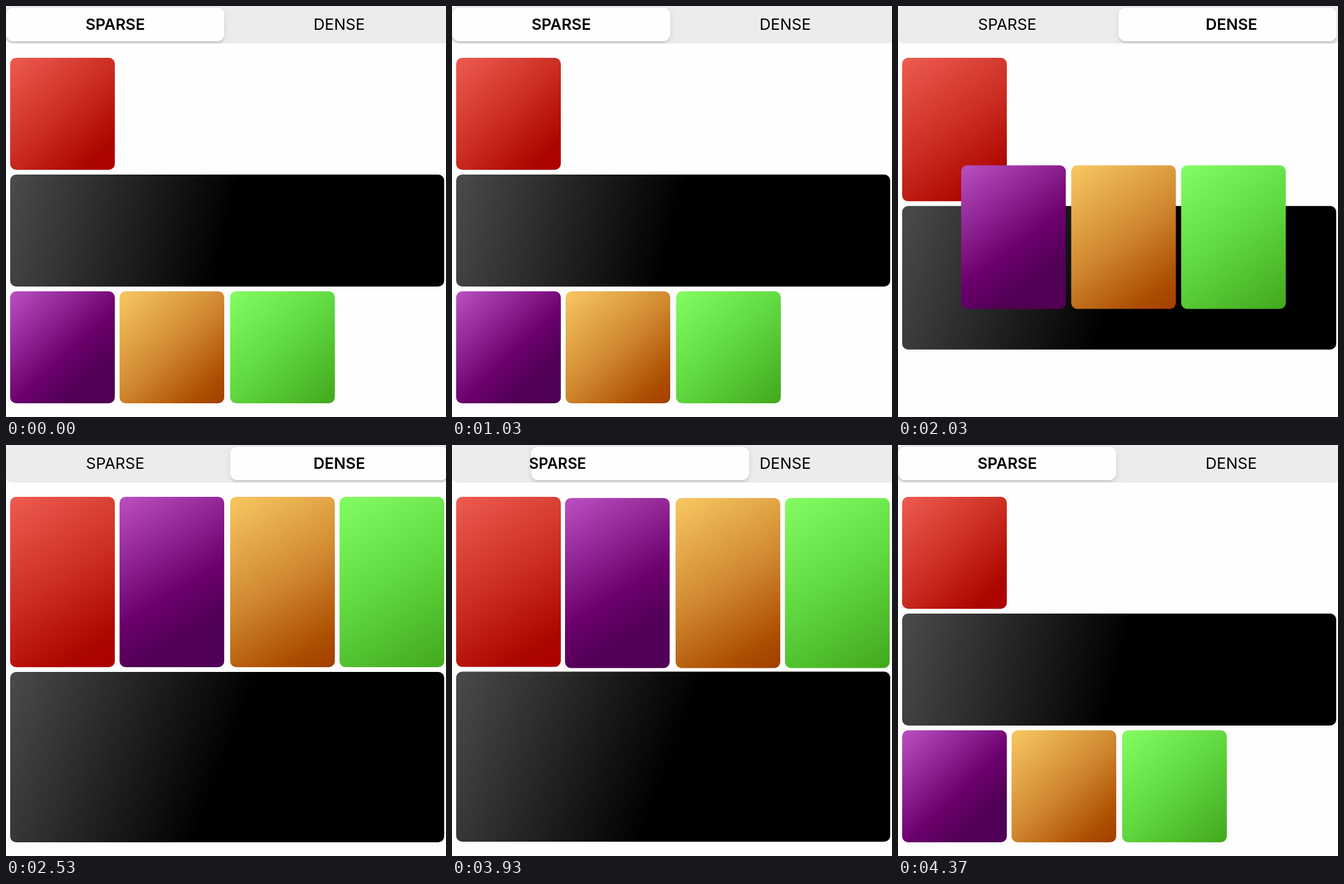
Recreate the animation shown at these times as an HTML page with a canvas. Size 740 by 690 pixels, loop 4410 ms.

```html
<!DOCTYPE html>
<html lang="en">
<head>
<meta charset="utf-8">
<title>Sparse and dense grid</title>
<style>
  html, body { margin: 0; width: 100%; height: 100%; overflow: hidden; background: #fefefe; }
  canvas { display: block; width: 740px; height: 690px; }
</style>
</head>
<body>
<canvas id="stage" width="740" height="690"></canvas>
<script>
const ctx = document.getElementById('stage').getContext('2d');
const LOOP = 4410;
const TAPS = [1771, 3836];   // release times: to dense, back to sparse
const LAYOUT_DELAY = 76, LAYOUT_TIME = 350, SPRING = 0.0235;
const PAPER = '#fefefe', TRACK = '#ececec';

// Positions are [x, y] in each layout; stops run along the diagonal.
const cards = [
  { sparse: [7, 87], dense: [7, 87], w: 176,
    stops: [[0, '#ee5c52'], [0.5, '#ca2c20'], [0.85, '#ac0600'], [1, '#ac0000']] },
  { sparse: [7, 283], dense: [7, 381], w: 730,
    stops: [[0, '#4b4b4b'], [0.5, '#000000'], [1, '#000000']] },
  { sparse: [7, 479], dense: [191, 87], w: 176,
    stops: [[0, '#bb50c2'], [0.55, '#6c006e'], [0.78, '#500054'], [1, '#500056']] },
  { sparse: [191, 479], dense: [377, 87], w: 176,
    stops: [[0, '#f8c862'], [0.5, '#d08830'], [0.85, '#ac4e00'], [1, '#a23e00']] },
  { sparse: [377, 479], dense: [561, 87], w: 176,
    stops: [[0, '#84fc64'], [0.5, '#60d840'], [1, '#42a81c']] }
];

const clamp = v => Math.min(1, Math.max(0, v));
const mix = (a, b, p) => a + (b - a) * p;

function easeInOut(x) {
  x = clamp(x);
  let lo = 0, hi = 1;
  for (let i = 0; i < 24; i++) {
    const s = (lo + hi) / 2, r = 1 - s;
    if (1.26 * s * r * r + 1.74 * s * s * r + s * s * s < x) lo = s; else hi = s;
  }
  return lo * lo * (3 - 2 * lo);
}

function spring(t) {
  const u = Math.max(0, t) * SPRING;
  return 1 - Math.exp(-u) * (1 + u);
}

function roundRect(x, y, w, h, r) {
  ctx.beginPath();
  ctx.roundRect(x, y, w, h, r);
}

function drawCard({ sparse, dense, w, stops }, p) {
  const x = mix(sparse[0], dense[0], p), y = mix(sparse[1], dense[1], p);
  const h = mix(188, 286, p);
  const fill = ctx.createLinearGradient(x, y, x + w, y + h);
  for (const [at, color] of stops) fill.addColorStop(at, color);
  ctx.fillStyle = fill;
  roundRect(x, y, w, h, 10);
  ctx.fill();
}

function drawLabel(text, x, selected, progress, side, alpha) {
  const bump = selected ? 4 * progress * (1 - progress) : 0;
  const scale = 1 - 0.044 * bump;
  ctx.save();
  ctx.translate(x + side * 6.6 * bump, 31);
  ctx.scale(scale, scale);
  ctx.font = `${selected ? 600 : 400} 26px Inter, sans-serif`;
  ctx.textAlign = 'center';
  ctx.fillStyle = `rgba(0,0,0,${alpha})`;
  ctx.fillText(text, 0, 9.4);
  ctx.restore();
}

// Unselected labels dim while the finger is down.
function pressAlpha(t, release) {
  return 1 - 0.3 * clamp((t - release + 90) / 40) * clamp((release + 20 - t) / 20);
}

function drawControl(t) {
  const [toDense, toSparse] = TAPS;
  const denseSelected = t >= toDense && t < toSparse;
  const progress = t < toDense ? 1 : spring(t - (denseSelected ? toDense : toSparse));
  const thumbX = mix(0.5, 377, denseSelected ? progress : 1 - progress);

  ctx.save();
  roundRect(-3, -1, 750, 64, 14);
  ctx.fillStyle = TRACK;
  ctx.fill();
  ctx.clip();
  ctx.fillStyle = PAPER;
  for (const [blur, dy, alpha] of [[8, 3, 0.12], [1, 3, 0.05]]) {
    ctx.shadowColor = `rgba(0,0,0,${alpha})`;
    ctx.shadowBlur = blur;
    ctx.shadowOffsetY = dy;
    roundRect(thumbX, 3, 366.5, 56, 12);
    ctx.fill();
  }
  ctx.restore();

  drawLabel('SPARSE', 183.7, !denseSelected, progress, -1, pressAlpha(t, toSparse));
  drawLabel('DENSE', 560.5, denseSelected, progress, 1, pressAlpha(t, toDense));
}

function draw(now) {
  const t = now % LOOP;
  const [into, back] = TAPS.map(tap => easeInOut((t - tap - LAYOUT_DELAY) / LAYOUT_TIME));
  ctx.fillStyle = PAPER;
  ctx.fillRect(0, 0, 740, 690);
  drawControl(t);
  for (const card of cards) drawCard(card, into - back);
}

let start;
function tick(now) {
  start ??= now;
  draw(now - start);
  requestAnimationFrame(tick);
}
draw(0);
requestAnimationFrame(tick);
</script>
</body>
</html>
```
